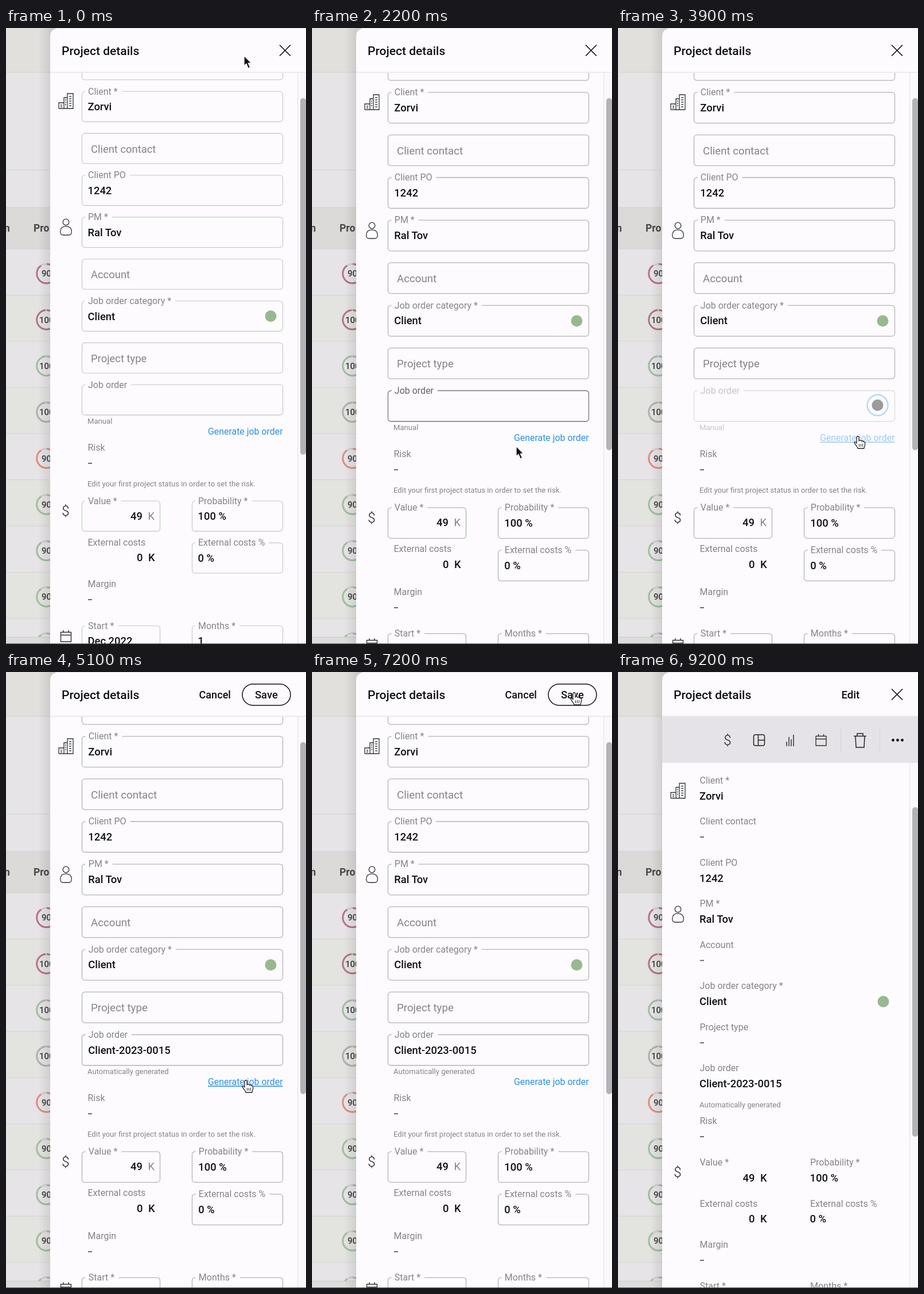
Recreate the animation shown at these times as an HTML page. Size 523 by 1071 pixels, loop 9300 ms.

```html
<!DOCTYPE html>
<html lang="en">
<head>
<meta charset="utf-8">
<title>Project details</title>
<style>
  html, body { margin: 0; width: 100%; height: 100%; overflow: hidden; }
  svg { display: block; width: 523px; height: 1071px; font-family: Roboto, Inter, sans-serif; }
</style>
</head>
<body>
<svg id="stage" viewBox="0 0 523 1071"></svg>
<script>
const LOOP = 9300, CLICK = 3700, GENERATED = 4400, SAVE = 7600, SAVED = 8700;
const PANEL = '#fdfbfe', INK = '#111113', GREY = '#848387', BLUE = '#2f8fe6';
const FIELDS = [
  ['Client *', 'Zorvi'], ['Client contact'], ['Client PO', '1242'], ['PM *', 'Ral Tov'],
  ['Account'], ['Job order category *', 'Client'], ['Project type'], ['Job order', '']
];
// time, x, y of the pointer
const PATH = [
  [600, 416, 49], [900, 408, 150], [1500, 370, 530], [2000, 355, 655], [2200, 357, 728],
  [2600, 361, 730], [3000, 418, 711], [6400, 418, 711], [6500, 446, 540],
  [6600, 469, 285], [6700, 472, 237], [6800, 465, 110], [6900, 457, 50], [7100, 457, 37]
];

const stage = document.getElementById('stage');
const ruler = document.createElement('canvas').getContext('2d');
const mix = (a, b, k) => a + (b - a) * k;

function text(x, y, s, size = 18.4, fill = INK, more = 'font-weight="500"') {
  return `<text x="${x}" y="${y}" font-size="${size}" fill="${fill}" ${more}>${s}</text>`;
}
const label = (x, y, s, fill = GREY, size = 16) => text(x, y, s, size, fill, '');
const note = (y, s, fill = GREY) => text(142, y, s, 13.1, fill, '');
const rect = (x, y, w, h, fill, more = '') =>
  `<rect x="${x}" y="${y}" width="${w}" height="${h}" fill="${fill}" ${more}/>`;
const dash = y => rect(143, y - 1, 7, 1.7, '#555458');
const right = (x, y, s) => text(x, y, s, 18.4, INK, 'font-weight="500" text-anchor="end"');
const circle = (x, y, r, fill, more = '') => `<circle cx="${x}" cy="${y}" r="${r}" fill="${fill}" ${more}/>`;
const line = (d, color = '#333', w = 1.3, more = '') =>
  `<path d="${d}" fill="none" stroke="${color}" stroke-width="${w}" ${more}/>`;
const at = (x, y, s) => `<g transform="translate(${x} ${y})">${s}</g>`;

function textWidth(s, size) {
  ruler.font = size + 'px Roboto, Inter, sans-serif';
  return ruler.measureText(s).width;
}

function shade(a, b, k) {
  const v = Math.round(mix(a, b, k));
  return `rgb(${v},${v},${v + 2})`;
}

const ICON = {
  building: line('M0 27V17H9V27M9 27V8H15V27M15 27V1H25V27ZM0 27H9M9 27H15') +
    line('M3 21H6M3 24H6M18 6H22M18 10H22M18 14H22M18 18H22M18 22H22M11 12H13M11 16H13M11 20H13', '#444', 1.6),
  person: circle(10.5, 6, 5.3, 'none', 'stroke="#333" stroke-width="1.3"') +
    line('M.7 23C.7 16 5 13.3 10.5 13.3S20.3 16 20.3 23C20.3 27 18 28.5 15 28.5H6C3 28.5 .7 27 .7 23Z'),
  dollar: text(0, 0, '$', 24, '#222', 'text-anchor="middle" font-weight="300"'),
  calendar: line('M1 3.5H19V20H1ZM1 8.5H19M5.5 0V4M14.5 0V4', '#333', 1.4, 'stroke-linejoin="round"'),
  close: line('M0 0L19 19M19 0L0 19', INK, 1.7)
};

const toolbar = rect(77, 78, 446, 80, '#e5e3e7') + at(191, 127, ICON.dollar) +
  rect(236.5, 109, 19, 19, 'none', 'rx="3" stroke="#222" stroke-width="1.5"') +
  line('M244.5 109V128M244.5 118.5H255', '#222', 1.5) +
  line('M294 129V121M298 129V113M302 129V117M306 129V109', '#333', 1.5) +
  at(344, 108, ICON.calendar) + line('M388.5 98V140M456.5 98V140', '#d3d1d5', 1) +
  line('M411 111.5H433M417 111V107H427V111M414 112L415 131H429L430 112', '#222', 1.5) +
  [479.5, 487.5, 495.5].map(x => circle(x, 118.5, 2.4, INK)).join('');

function backdrop() {
  let s = rect(0, 0, 523, 1071, '#e6e4e7') + rect(0, 0, 90, 77, '#e1e0dc') + rect(0, 76.5, 90, 1, '#d2d1d0') +
    rect(0, 246.5, 90, 1, '#d2d1d3') + rect(0, 312, 90, 72, '#dbdad8') + rect(0, 311.5, 90, 1, '#d3d2d2') +
    text(-3, 354, 'n', 17.5, '#48474a', 'font-weight="700"') +
    text(48, 354, 'Pro', 17.5, '#48474a', 'font-weight="700"');
  const rose = '#b8718c', green = '#9fc09d';
  [rose, rose, green, '#b1b0b3', '#e18e7b', green, green, green, green].forEach((color, i) => {
    const y = 427 + 80.3 * i, full = i > 0 && i < 4;
    s += rect(0, y - 43, 90, 80.3, i % 2 ? '#e3e3df' : '#e6e4e7') + rect(0, y - 43.5, 90, 1, '#d4d3d3') +
      circle(70.5, y, 16.8, 'none', 'stroke="#d0ced0" stroke-width="3"') +
      circle(70.5, y, 16.8, 'none', `stroke="${color}" stroke-width="3" pathLength="100"
        stroke-dasharray="${full ? 98 : 90} 100" transform="rotate(-88 70.5 ${y})"`) +
      text(full ? 58 : 62, y + 5.3, full ? 100 : 90, 15, '#3a393c');
  });
  return s + rect(0, 1059, 90, 12, '#dddddb') + rect(0, 1058.5, 90, 1, '#c9c9c8') +
    '<defs><linearGradient id="shadow"><stop stop-opacity="0"/><stop offset="1" stop-opacity=".13"/></linearGradient>' +
    '<clipPath id="body"><path d="M77 78H523V1071H77Z"/></clipPath></defs>' +
    rect(56, 0, 30, 1071, 'url(#shadow)') +
    `<path d="M77 1071V15Q77 1 91 1H523V1071Z" fill="${PANEL}"/>`;
}

function pointer(t) {
  const i = PATH.findIndex(p => p[0] > t);
  if (i < 0) return PATH[PATH.length - 1].slice(1);
  if (!i) return PATH[0].slice(1);
  const a = PATH[i - 1], b = PATH[i], k = (t - a[0]) / (b[0] - a[0]);
  return [mix(a[1], b[1], k), mix(a[2], b[2], k)];
}

// hover styling trails the pointer and fades out
function hover(t, top, height) {
  const inside = time => {
    const [x, y] = pointer(time);
    return x > 132 && x < 482 && y > top && y < top + height;
  };
  return inside(t - 100) ? 1 : inside(t - 200) ? 0.5 : 0;
}

function box(x, y, w, h, name, value, k = 1, hot = 0) {
  const lx = x + 11 + k * 0.8;
  const edge = shade(mix(196, 180, k), 55, hot);
  const s = rect(x + .5, y, w, h, 'none', `rx="5" stroke="${edge}" stroke-width="${1.1 + .2 * k}"`);
  if (value === undefined) return s + label(x + 16, y + h / 2 + 7.2, name, GREY, 18.4 + .3 * k);
  return s + rect(lx - 5, y - 2, textWidth(name, 16) + 12, 4, PANEL) +
    label(lx, y + 5.3, name, shade(132, 65, hot)) + text(lx - .5, y + 33, value);
}

function editForm(t) {
  const k = Math.min(1, t / 200);
  const start = mix(110.3, 111.8, k), pitch = mix(72.85, 74.1, k), h = mix(52.6, 53.5, k);
  const busy = t >= CLICK && t < GENERATED, done = t >= GENERATED;
  const d = mix(0, 11.3, k);
  const [px, py] = pointer(t);
  const onLink = px > 351 && px < 483 && py > 703 && py < 724;
  let s = box(132, start - pitch, 350, h, '', '', k);
  FIELDS.forEach(([name, value], i) => {
    const y = start + pitch * i, job = i === 7;
    const b = box(132, y, 350, h, name, job && done ? 'Client-2023-0015' : value, k, hover(t, y, h));
    s += job && busy ? `<g opacity=".45">${b}</g>` : b;
    if (i === 5) s += circle(461.5, y + h / 2 + .2, 10, '#98b98f');
    if (job && busy) s += circle(452.5, y + 25.3, 18, '#fbfbfd', 'stroke="#b4daf0" stroke-width="2.4"') +
      circle(452.5, y + 25.3, 10, '#9b9b9d');
  });
  s += `<g opacity="${busy ? .45 : 1}">` + note(688 + d, done ? 'Automatically generated' : 'Manual') +
    text(352, 707 + d, 'Generate job order', 15.9, BLUE, onLink ? 'text-decoration="underline"' : '') + '</g>';
  const y = 822.3 + d * 1.02, y2 = y + pitch, y3 = y + mix(217, 219, k);
  return s + label(142.5, 735 + d, 'Risk') + dash(757 + d) +
    note(797 + d, 'Edit your first project status in order to set the risk.') +
    box(132, y, 136, h, 'Value *', '', k) + right(238, y + 32.5, '49') + text(247.5, y + 32.5, 'K', 18.4, GREY, '') +
    box(324, y, 158, h, 'Probability *', '100 %', k) +
    label(142.5, y + 77.5, 'External costs') + right(238.5, y + 105, '0') + text(248, y + 105, 'K') +
    box(324, y2, 158, h, 'External costs %', '0 %', k) +
    label(142.5, y + mix(150, 152.5, k), 'Margin') + dash(mix(994, 1008, k)) +
    box(132, y3, 136, h, 'Start *', 'Dec 2022', k) + box(324, y3, 158, h, 'Months *', '1', k) +
    at(92, 113 + 2 * k, ICON.building) + at(94, 331.5 + 6 * k, ICON.person) +
    at(104, 848 + 12 * k, ICON.dollar) + at(94.5, 1047 + 14 * k, ICON.calendar);
}

function viewForm(t) {
  const drop = Math.max(0, 1 - (t - SAVE + 50) / 345) ** 3;
  let s = '';
  FIELDS.forEach(([name, value], i) => {
    const y = 193.5 + 71.55 * i, job = i === 7;
    s += value === undefined
      ? label(142.5 + 6 * drop, y + 36 * drop, name, GREY, 16 + 2.7 * drop) + dash(y + 22)
      : label(142.5, y, name) + text(142, y + 28, job ? 'Client-2023-0015' : value);
  });
  return s + circle(462.5, 573, 10, '#98b98f') + note(756.5, 'Automatically generated') +
    label(142.5, 786, 'Risk') + dash(808) +
    label(142.5, 858, 'Value *') + right(238.5, 885.5, '49') + text(248, 885.5, 'K') +
    label(335, 858, 'Probability *') + text(334.5, 885.5, '100 %') +
    label(142.5, 929.5, 'External costs') + right(238.5, 957, '0') + text(248, 957, 'K') +
    label(335, 929.5, 'External costs %') + text(334.5, 957, '0 %') +
    label(142.5, 1001, 'Margin') + dash(1023) + label(142.5, 1072.5, 'Start *') + label(335, 1072.5, 'Months *') +
    at(92, 192.5, ICON.building) + at(94, 406.5, ICON.person) + at(104, 878, ICON.dollar);
}

function header(t) {
  const close = at(477, 29.5, ICON.close);
  const s = text(97, 46.5, 'Project details', 21) + rect(77, 76.5, 446, 1, '#dcdadd');
  if (t < GENERATED) return s + close;
  if (t < SAVE) return s + text(336.5, 45.5, 'Cancel', 18.1) +
    rect(412, 21, 84, 37, PANEL, `rx="18.5" stroke="${INK}" stroke-width="1.5"`) + text(434, 45.5, 'Save');
  return s + (t < SAVED ? text(416, 45.5, 'Saving') : text(389.5, 45.5, 'Edit', 18.6) + close);
}

function cursor(t) {
  if (t >= SAVED) return '';
  const [x, y] = pointer(t);
  const outline = (d, fill, stroke) =>
    `<path d="${d}" fill="${fill}" stroke="${stroke}" stroke-width="1.3" stroke-linejoin="round"/>`;
  if (t >= SAVE) return at(x, y, line('M-4 -9Q0 -9 0 -6V6Q0 9 -4 9M4 -9Q0 -9 0 -6M0 6Q0 9 4 9M-2 1H2', '#333', 1.5));
  const hand = (t >= 3000 && t <= 6400) || t >= 6900;
  return at(x, y, hand
    ? outline('M-2 1C-2 -2 2 -2 2 1V7C3 5 6 5 6 7.5C7 6 9.5 6.5 9.5 8.5C11 7.5 12.5 8.5 12.5 10V14C12.5 16 11 17 11 20H0C0 17 -5 13 -6 10C-6 8 -4 8 -2 11Z', '#fff', '#222') +
      line('M2.5 12V17M5.5 12V17M8.5 12V17', '#222', 1)
    : outline('M-1 -1V17L3 13.3L6.2 21L9.6 19.6L6.3 12.2H12Z', '#111', '#fff'));
}

const BACK = backdrop();

function frame(t) {
  const view = t >= SAVE, top = view ? 158 : 78;
  const [from, to] = view ? [235, 808] : [122, 742 - 8 * Math.min(1, t / 200)];
  return BACK + `<g clip-path="url(#body)">${view ? viewForm(t) : editForm(t)}</g>` +
    rect(508, top, 15, 1071 - top, '#faf8fb') + rect(508, top, 1, 1071 - top, '#e4e2e5') +
    rect(513, from, 10, to - from, '#b4b2b5', 'rx="5"') +
    (view ? toolbar : '') + header(t) + rect(0, 1070, 523, 1, '#5a595b') + cursor(t);
}

let shown = -1;
function tick() {
  const t = Math.floor(performance.now() % LOOP / 100) * 100;
  if (t !== shown) stage.innerHTML = frame(shown = t);
  requestAnimationFrame(tick);
}
tick();
</script>
</body>
</html>
```
